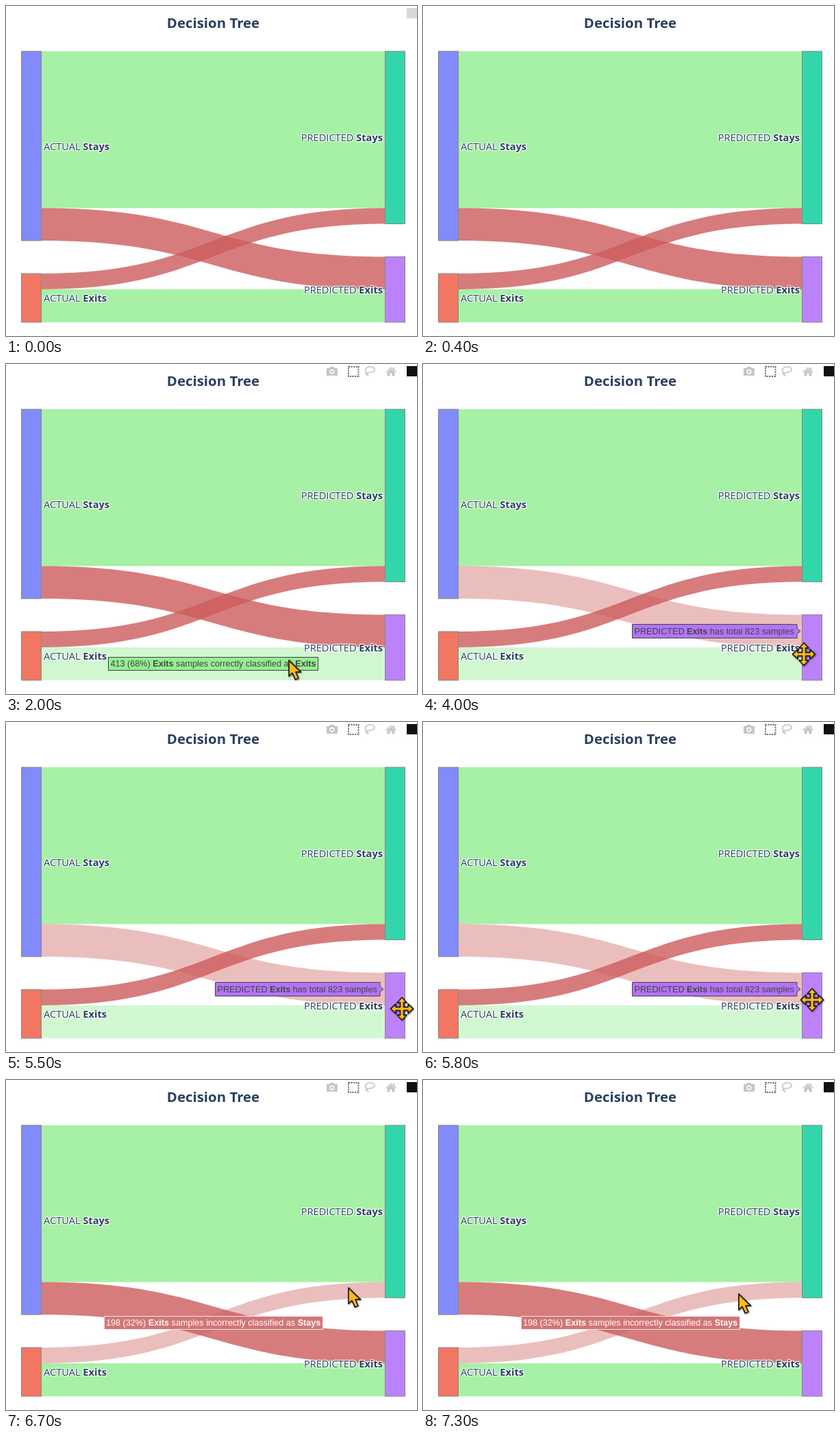
An HTML page that plays this animation: 600 by 481 pixels, repeating every 8000 ms.

```html
<!DOCTYPE html>
<html lang="en">
<head>
<meta charset="utf-8">
<title>Decision Tree</title>
<style>
  html, body { margin: 0; width: 100%; height: 100%; overflow: hidden; background: #fff; }
  svg { display: block; width: 600px; height: 481px; }
  .label { font: 14.6px "Open Sans", sans-serif; fill: #2a3f5f;
    text-shadow: 1px 1px 1px #fff, -1px -1px 1px #fff, 1px -1px 1px #fff, -1px 1px 1px #fff; }
  .title { font: bold 20.4px "Open Sans", sans-serif; fill: #2a3f5f; }
  .tip { font: 12.65px "Liberation Sans", Arial, sans-serif; fill: #444; }
  .end { text-anchor: end; }
  .mid { text-anchor: middle; }
  .bold { font-weight: bold; }
  .node { stroke: #888; }
  #cursors { filter: drop-shadow(1px 1px 1px #0006); }
</style>
</head>
<body>
<svg viewBox="0 0 600 481">
  <g id="links"></g>
  <g id="nodes"></g>
  <text class="title mid" x="302.5" y="32">Decision Tree</text>
  <g id="labels"></g>

  <g id="bar">
    <g id="tools" fill="#c6c6c6">
      <path fill-rule="evenodd" d="M468 7q0-1 1-1h3l1.5-2h5l1.5 2h3q1 0 1 1v9q0 1-1 1h-14q-1 0-1-1zM476 7.500a3.700 3.700 0 1 0 .1 0z"/>
      <circle cx="476" cy="11.200" r="1.900"/>
      <rect x="500" y="4" width="14.500" height="14" fill="none" stroke="#666" stroke-width="2" stroke-dasharray="2 1.560"/>
      <path fill="none" stroke="#c6c6c6" stroke-width="1.700" d="M527 13c-5-4-1-9 5-9s8 5 4 7-6 1-9 2-2 3 1 2q1 1 0 3"/>
      <path d="M554 11.500l8-7 3 2.700V5h2v3.500l3 3-1 1-7-6-7 6zM556.500 12l5.500-4.700 5.500 4.700v5.500h-4v-4h-3v4h-4z"/>
    </g>
    <rect x="585" y="3" width="15" height="15" fill="#111"/>
  </g>

  <g id="tips" class="tip">
    <g id="tip-hit">
      <rect x="149.500" y="427.500" width="306" height="19" fill="#97ed93" stroke="#444"/>
      <text x="152.500" y="441">413 (68%) <tspan class="bold">Exits</tspan> samples correctly classified as <tspan class="bold">Exits</tspan></text>
    </g>
    <g id="tip-node">
      <path d="M551 389.500l-5-4V379.500H305.500V399.500H546V393.500z" fill="#b274f4" stroke="#444"/>
      <text x="308.500" y="393.500">PREDICTED <tspan class="bold">Exits</tspan> has total 823 samples</text>
    </g>
    <g id="tip-miss">
      <rect x="143.500" y="344.500" width="319" height="19" fill="#d27576" stroke="#f6e3e3"/>
      <text x="146" y="358" fill="#fff">198 (32%) <tspan class="bold">Exits</tspan> samples incorrectly classified as <tspan class="bold">Stays</tspan></text>
    </g>
  </g>

  <g id="cursors" stroke="#222" stroke-width="1.800" stroke-linejoin="round" fill="#ffb914">
    <path id="arrow" d="M0 0V23L5 18.500 9.500 28 14 26 10 17H17.500z"/>
    <path id="move" d="M0-16.500L7-9H2.500V-2.500H9V-7L16.500 0 9 7V2.500H2.500V9H7L0 16.500-7 9H-2.500V2.500H-9V7L-16.500 0-9-7V-2.500H-2.500V-9H-7z"/>
    <g id="cross">
      <path d="M-14 0H14M0-14V14" stroke-width="4"/>
      <path d="M-13 0H13M0-13V13" stroke="#ffb945" stroke-width="1.300"/>
    </g>
  </g>
</svg>
<script>
const $ = id => document.getElementById(id);

// left top, right top, thickness, colour
const links = [
  [66, 66, 228.5, '#90ee90'],
  [294.5, 365.5, 47.5, '#cd5c5c'],
  [390, 294.5, 23, '#cd5c5c'],
  [413, 413, 48, '#90ee90']
];
$('links').innerHTML = links.map(([a, b, h, color]) =>
  `<path fill="${color}" d="M52 ${a}C302.5 ${a} 302.5 ${b} 553 ${b}V${b + h}C302.5 ${b + h} 302.5 ${a + h} 52 ${a + h}z"/>`).join('');

// x, top, bottom, colour
const nodes = [
  [22.5, 66, 342, '#828bfb'], [22.5, 390, 461, '#f27762'],
  [553.5, 66, 317.5, '#33d6ab'], [553.5, 365.5, 461, '#bc82fb']
];
$('nodes').innerHTML = nodes.map(([x, top, bottom, color]) =>
  `<rect class="node" x="${x}" y="${top}" width="29" height="${bottom - top}" fill="${color}"/>`).join('');

const label = (x, y, side, name, align = '') =>
  `<text class="label ${align}" x="${x}" y="${y}">${side} <tspan class="bold">${name}</tspan></text>`;
$('labels').innerHTML =
  label(55, 209.5, 'ACTUAL', 'Stays') + label(55, 430.5, 'ACTUAL', 'Exits') +
  label(550, 196.5, 'PREDICTED', 'Stays', 'end') + label(550, 418.5, 'PREDICTED', 'Exits', 'end');

// what each hover state lights up: cursor, faded links, tooltip
const states = {
  none: ['', []],
  out: ['cross', []],
  hit: ['arrow', [3], 'tip-hit'],
  node: ['move', [1, 3], 'tip-node'],
  wrong: ['arrow', [1]],
  miss: ['arrow', [2], 'tip-miss']
};

// start time, cursor x, cursor y, state
const steps = [
  [0, 0, 0, 'none'],
  [1400, 588, 446, 'out'], [1500, 500, 438, 'hit'], [1600, 440, 434, 'hit'], [1700, 413, 432, 'hit'],
  [4000, 556, 423, 'node'], [4100, 560, 432, 'node'], [4200, 566, 443, 'node'],
  [4700, 573, 432, 'node'], [4800, 580, 419, 'node'],
  [5200, 563, 435, 'node'], [5500, 578, 418, 'node'],
  [5800, 568, 405, 'node'], [5900, 530, 374, 'wrong'], [6000, 502, 341, 'out'],
  [6100, 512, 350, 'out'], [6200, 540, 385, 'wrong'], [6300, 566, 416, 'node'],
  [6700, 500, 303, 'miss'], [6800, 456, 301, 'miss'], [7300, 461, 312, 'miss']
];

const show = (el, on) => el.style.display = on ? '' : 'none';

function draw(t) {
  const [, x, y, state] = steps.findLast(s => s[0] <= t);
  const [cursor, faded, tip] = states[state];
  [...$('links').children].forEach((el, i) => el.setAttribute('opacity', faded.includes(i) ? 0.4 : 0.8));
  for (const el of $('tips').children) show(el, el.id === tip);
  for (const el of $('cursors').children) show(el, el.id === cursor);
  $('cursors').setAttribute('transform', `translate(${x} ${y})`);

  const tick = Math.floor(t / 100);
  $('bar').setAttribute('opacity', tick < 14 ? Math.max(0, 0.16 - tick * 0.04) : Math.min(1, (tick - 13) / 4));
  show($('tools'), tick >= 14);
}

const start = performance.now();
function frame() {
  draw((performance.now() - start) % 8000);
  requestAnimationFrame(frame);
}
frame();
</script>
</body>
</html>
```
